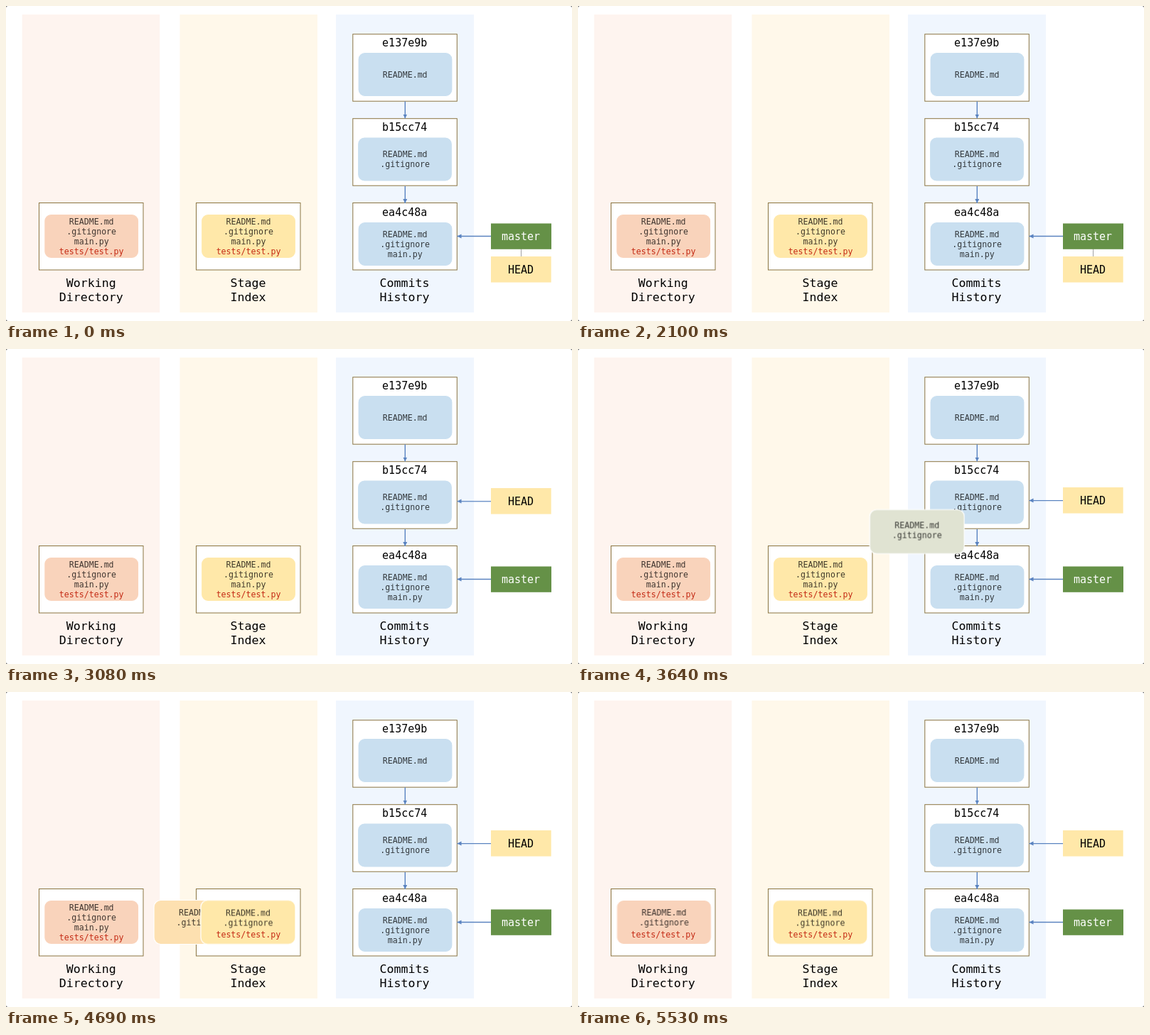
Recreate the animation shown at these times as an HTML page. Size 796x444 px, loop 5600 ms.

```html
<!DOCTYPE html>
<html lang="en">
<head>
<meta charset="utf-8">
<title>Moving HEAD back one commit</title>
<style>
  html, body { margin: 0; width: 100%; height: 100%; overflow: hidden; background: #555; }
  svg { display: block; width: 796px; height: 444px; background: #fff; border-radius: 3px; }
  text { font-family: "DejaVu Sans Mono", monospace; text-anchor: middle; }
  .title { font-size: 16.6px; }
  .name { font-size: 15px; }
  .file { font-size: 11.6px; fill: rgba(0, 0, 0, .75); }
  .red { fill: #c42a14; }
  .box { fill: #fff; stroke: #8a7440; }
  .tile { stroke: #fff; stroke-width: 1.2; }
  .blue { fill: #c9dff0; }
  .yellow { fill: #ffe8a9; }
  .orange { fill: #f9d3bb; }
  .arrow { stroke: #5a83c0; stroke-width: 1.4; marker-end: url(#tip); }

  .anim { animation: 5600ms cubic-bezier(.37, 0, .63, 1) infinite both; }
  .linear { animation-timing-function: linear; }

  #head { animation-name: head; }
  #link { animation-name: unlink; }
  #headArrow { animation-name: link; }
  #toStage { animation-name: toStage; }
  #toStage rect { animation-name: blueToYellow; }
  #toStage .lines { animation-name: lift; }
  #toWork { animation-name: toWork; }
  #toWork rect { animation-name: yellowToOrange; }
  #stageTest { animation-name: stageTest; }
  #workTest { animation-name: workTest; }

  @keyframes head {
    0%, 39.46% { transform: translateY(0); }
    55.89%, 100% { transform: translateY(-158px); }
  }
  @keyframes unlink {
    0%, 39.46% { opacity: 1; }
    43.5%, 100% { opacity: 0; }
  }
  @keyframes link {
    0%, 39.46% { opacity: 0; }
    43.5%, 100% { opacity: 1; }
  }
  @keyframes toStage {
    0%, 58.03% { transform: translate(494.5px, 185px); opacity: 0; }
    58.04% { transform: translate(494.5px, 185px); opacity: 1; }
    74.46%, 100% { transform: translate(274px, 293.5px); opacity: 1; }
  }
  @keyframes blueToYellow {
    0%, 58.04% { fill: #c9dff0; }
    74.46%, 100% { fill: #ffe8a9; }
  }
  @keyframes lift {
    0%, 58.04% { transform: translateY(6.5px); }
    74.46%, 100% { transform: translateY(0); }
  }
  @keyframes toWork {
    0%, 77.67% { transform: translate(274px, 293.5px); opacity: 0; }
    77.68% { transform: translate(274px, 293.5px); opacity: 1; }
    94.11%, 100% { transform: translate(54.5px, 293.5px); opacity: 1; }
  }
  @keyframes yellowToOrange {
    0%, 77.68% { fill: #ffe8a9; }
    94.11%, 100% { fill: #f9d3bb; }
  }
  @keyframes stageTest {
    0%, 67.1% { opacity: 0; }
    71.2%, 100% { opacity: 1; }
  }
  @keyframes workTest {
    0%, 86.7% { opacity: 0; }
    90.8%, 100% { opacity: 1; }
  }
</style>
</head>
<body>
<svg viewBox="0 0 796 444">
  <defs>
    <marker id="tip" markerUnits="userSpaceOnUse" markerWidth="7" markerHeight="7" refX="6" refY="3" orient="auto">
      <path d="M0 0L6 3L0 6z" fill="#5a83c0"/>
    </marker>
    <rect id="box" width="146.5" height="94.5"/>
    <rect id="tile" width="133" height="62" rx="9.5"/>
  </defs>

  <!-- columns -->
  <rect x="22.7" y="12" width="193.5" height="420" fill="#fef4ef"/>
  <rect x="244.5" y="12" width="193.5" height="420" fill="#fff8ea"/>
  <rect x="464" y="12" width="194" height="420" fill="#f0f6fe"/>
  <g class="title">
    <text x="119.7" y="396">Working</text><text x="119.7" y="416">Directory</text>
    <text x="340.5" y="396">Stage</text><text x="340.5" y="416">Index</text>
    <text x="560.5" y="396">Commits</text><text x="560.5" y="416">History</text>
  </g>

  <!-- boxes -->
  <g class="box">
    <use href="#box" x="46.5" y="277.5"/>
    <use href="#box" x="267.5" y="277.5"/>
    <use href="#box" x="487.8" y="39.7"/>
    <use href="#box" x="487.8" y="158.7"/>
    <use href="#box" x="487.8" y="277.5"/>
  </g>

  <!-- commits -->
  <g class="tile blue">
    <use href="#tile" x="495" y="65.5"/>
    <use href="#tile" x="494.5" y="185"/>
    <use href="#tile" x="495" y="304.5"/>
  </g>
  <g class="name">
    <text x="560.7" y="57">e137e9b</text>
    <text x="560.7" y="176">b15cc74</text>
    <text x="560.7" y="296">ea4c48a</text>
  </g>
  <g class="file">
    <text x="561.2" y="101">README.md</text>
    <text x="561.2" y="213.3">README.md</text>
    <text x="561.2" y="227.3">.gitignore</text>
    <text x="561.2" y="325.7">README.md</text>
    <text x="561.2" y="339.7">.gitignore</text>
    <text x="561.2" y="353.7">main.py</text>
  </g>
  <path class="arrow" d="M561.3 134.5V158.5"/>
  <path class="arrow" d="M561.3 254V278"/>

  <!-- first state of the working directory and the stage -->
  <use class="tile orange" href="#tile" x="53.7" y="293.5"/>
  <use class="tile yellow" href="#tile" x="274.5" y="293.5"/>
  <g class="file">
    <text x="120.2" y="307.5">README.md</text>
    <text x="120.2" y="321.5">.gitignore</text>
    <text x="120.2" y="335.5">main.py</text>
    <text class="red" x="120.2" y="349.5">tests/test.py</text>
    <text x="341" y="307.5">README.md</text>
    <text x="341" y="321.5">.gitignore</text>
    <text x="341" y="335.5">main.py</text>
    <text class="red" x="341" y="349.5">tests/test.py</text>
  </g>

  <!-- travelling copies -->
  <g id="toWork" class="anim">
    <rect class="tile anim linear" width="133" height="62" rx="9.5"/>
    <g class="file">
      <text x="66.5" y="21.7">README.md</text>
      <text x="66.5" y="35.7">.gitignore</text>
    </g>
  </g>
  <g id="toStage" class="anim">
    <rect class="tile anim linear" width="133" height="62" rx="9.5"/>
    <g class="file lines anim">
      <text x="66.5" y="21.7">README.md</text>
      <text x="66.5" y="35.7">.gitignore</text>
    </g>
  </g>
  <g class="file">
    <text id="workTest" class="red anim linear" x="119.8" y="346">tests/test.py</text>
    <text id="stageTest" class="red anim linear" x="340.8" y="346">tests/test.py</text>
  </g>

  <!-- references -->
  <path id="link" class="anim linear" d="M724.5 342V354" stroke="#a0a0a0"/>
  <path class="arrow" d="M682 324.5H634.5"/>
  <rect x="682" y="306.5" width="85" height="36.3" fill="#659147"/>
  <text class="name" x="724" y="329.6" fill="#fff">master</text>
  <g id="head" class="anim">
    <g id="headArrow" class="anim linear"><path class="arrow" d="M682 371.6H634.5"/></g>
    <rect x="682" y="353" width="84.7" height="36.6" fill="#ffe8a9"/>
    <text class="name" x="724" y="376.6">HEAD</text>
  </g>
</svg>
</body>
</html>
```
